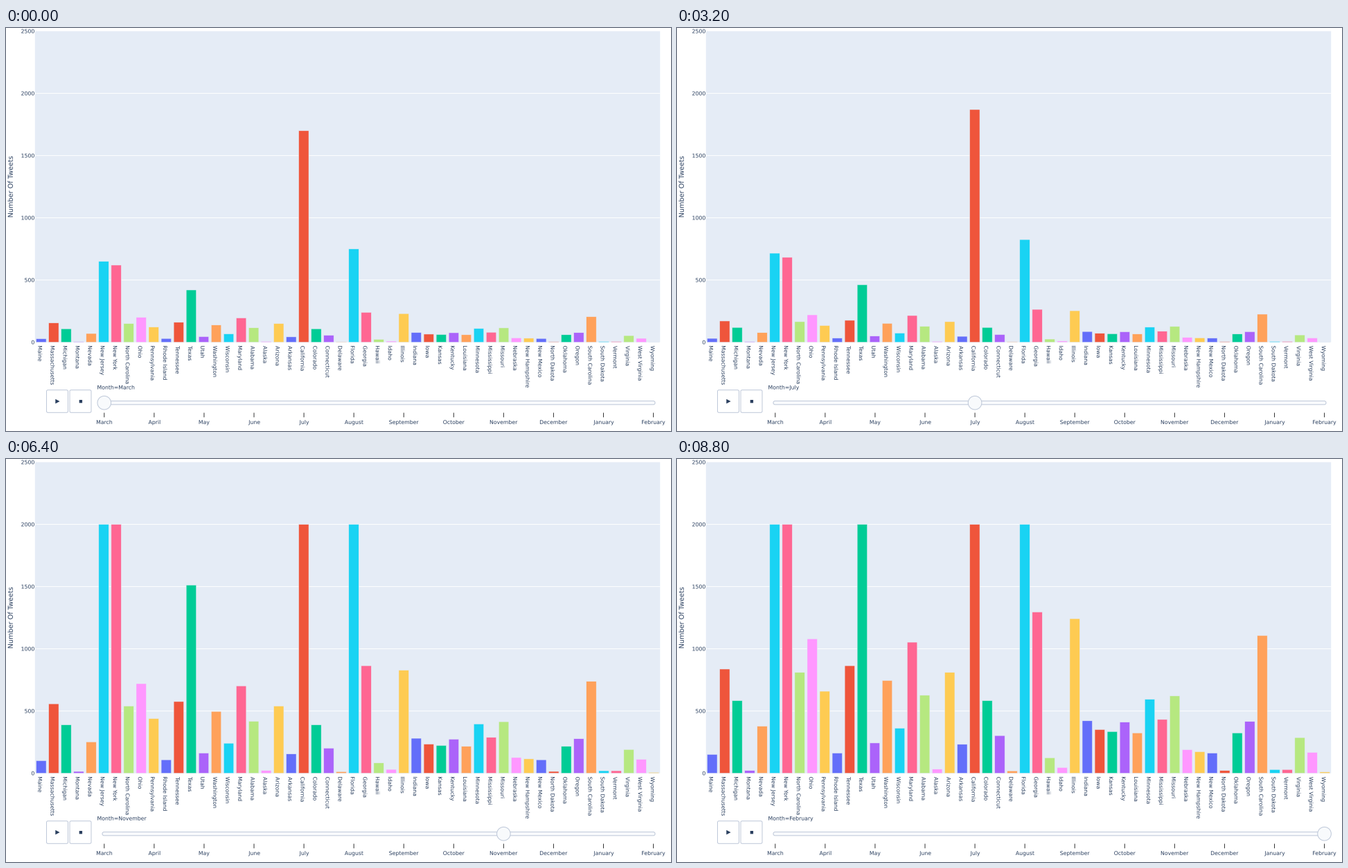
Recreate the animation shown at these times as a matplotlib script. Size 960x583 px, loop 9600 ms.

```python
import numpy as np
import matplotlib.pyplot as plt
from matplotlib.animation import FuncAnimation
from matplotlib.patches import (Circle, FancyBboxPatch, PathPatch, Polygon,
                                Rectangle)
from matplotlib.textpath import TextPath
from matplotlib.transforms import Affine2D

W, H, DPI = 960, 583, 100
PX = 72 / DPI
LEFT, RIGHT, TOP, BASE = 41.8, 944.2, 4.6, 454.6
UNIT = (BASE - TOP) / 2500
CAP = 2000
TEXT = 7.75
INK, PANEL, BORDER, PALE = "#2A3F5F", "#E5ECF6", "#BEC8D9", "#F8FAFC"
PALETTE = ["#636EFA", "#EF553B", "#00CC96", "#AB63FA", "#FFA15A",
           "#19D3F3", "#FF6692", "#B6E880", "#FF97FF", "#FECB52"]
MONTHS = ["March", "April", "May", "June", "July", "August", "September",
          "October", "November", "December", "January", "February"]

# Each state's size: its count in the peak month before the cap.
SIZES = {
    "Maine": 280, "Massachusetts": 1550, "Michigan": 1080, "Montana": 40,
    "Nevada": 700, "New Jersey": 6500, "New York": 6200,
    "North Carolina": 1500, "Ohio": 2000, "Pennsylvania": 1220,
    "Rhode Island": 300, "Tennessee": 1600, "Texas": 4200, "Utah": 450,
    "Washington": 1380, "Wisconsin": 670, "Maryland": 1950, "Alabama": 1160,
    "Alaska": 60, "Arizona": 1500, "Arkansas": 430, "California": 17000,
    "Colorado": 1080, "Connecticut": 560, "Delaware": 35, "Florida": 7500,
    "Georgia": 2400, "Hawaii": 230, "Idaho": 85, "Illinois": 2300,
    "Indiana": 780, "Iowa": 650, "Kansas": 620, "Kentucky": 760,
    "Louisiana": 600, "Minnesota": 1100, "Mississippi": 800,
    "Missouri": 1150, "Nebraska": 350, "New Hampshire": 320,
    "New Mexico": 300, "North Dakota": 40, "Oklahoma": 600, "Oregon": 770,
    "South Carolina": 2050, "South Dakota": 55, "Vermont": 55,
    "Virginia": 530, "West Virginia": 310, "Wyoming": 18}


def activity(month):
    """Share of the peak: a calm start, a steep rise, then a decline."""
    return np.interp(month, [0, 6, 7, 8, 9, 11],
                     [0.10, 0.115, 0.20, 0.36, 1, 0.54])


fig = plt.figure(figsize=(W / DPI, H / DPI), dpi=DPI, facecolor="white")
plt.rcParams["font.family"] = "DejaVu Sans"
plt.rcParams["path.snap"] = False
ax = fig.add_axes([0, 0, 1, 1])
ax.set(xlim=(0, W), ylim=(H, 0))
ax.axis("off")


def label(x, y, text, size=TEXT, align=0.0, angle=0):
    """Text on a baseline at (x, y); align 0 is left, 0.5 centre, 1 right."""
    path = TextPath((0, 0), text, size=size)
    box = path.get_extents()
    place = (Affine2D().translate(-box.x0 - align * box.width, 0)
             .scale(1, -1).rotate_deg(angle).translate(x, y))
    return ax.add_patch(PathPatch(path, fc=INK, lw=0, zorder=5,
                                  transform=place + ax.transData))


def rounded(x, y, w, h, r, fill):
    ax.add_patch(FancyBboxPatch(
        (x, y), w, h, boxstyle=f"round,pad=0,rounding_size={r}",
        fc=fill, ec=BORDER, lw=PX, zorder=4))


def line(xs, ys, color):
    ax.plot(xs, ys, color=color, lw=PX, solid_capstyle="butt", zorder=2)


def slider_x(month):
    return 141.8 + 72.07 * month


# Plot area
ax.add_patch(Rectangle((LEFT, TOP), RIGHT - LEFT, BASE - TOP, fc=PANEL, lw=0))
for tick in range(0, 2501, 500):
    y = BASE - tick * UNIT
    if 0 < tick < 2500:
        line([LEFT, RIGHT], [y, y], "white")
    label(40.8, y + 2.8, str(tick), align=1)
label(9.8, 229.5, "Number Of Tweets", size=9.7, align=0.5, angle=-90)

# Bars and state names
step = (RIGHT - LEFT) / len(SIZES)
bars = []
for i, state in enumerate(SIZES):
    center = LEFT + (i + 0.5) * step
    bar = Rectangle((center - 0.4 * step, BASE), 0.8 * step, 0,
                    fc=PALETTE[i % len(PALETTE)], ec=PANEL, lw=0.5 * PX,
                    zorder=3)
    bars.append(ax.add_patch(bar))
    label(center - 4.4, 460, state, angle=90)

# Buttons
for x in (58.5, 92):
    rounded(x, 523.7, 31, 32.6, 2, "white")
ax.add_patch(Polygon([(71.3, 536.8), (77.6, 540.1), (71.3, 543.4)],
                     fc=INK, lw=0, zorder=5))
ax.add_patch(Rectangle((105.7, 538), 4.4, 4.4, fc=INK, lw=0, zorder=5))

# Slider
rounded(139, 539.6, 798, 5.2, 2.5, PALE)
for i, month in enumerate(MONTHS):
    line([slider_x(i)] * 2, [556.6, 563.2], "#333333")
    label(slider_x(i) + 0.2, 572.9, month, align=0.5)
knob = ax.add_patch(Circle((slider_x(0), 542.2), 9.8, fc=PALE, ec=BORDER,
                           lw=PX, zorder=6))
caption = label(132.3, 522.6, "Month=")


def draw(month):
    for bar, size in zip(bars, SIZES.values()):
        height = min(CAP, size * activity(month)) * UNIT
        bar.set_y(BASE - height)
        bar.set_height(height)
    knob.center = slider_x(month), 542.2
    caption.set_path(TextPath((0, 0), f"Month={MONTHS[month]}", size=TEXT))
    return [*bars, knob, caption]


anim = FuncAnimation(fig, draw, frames=len(MONTHS), interval=800, repeat=True,
                     repeat_delay=0)
plt.show()
```
